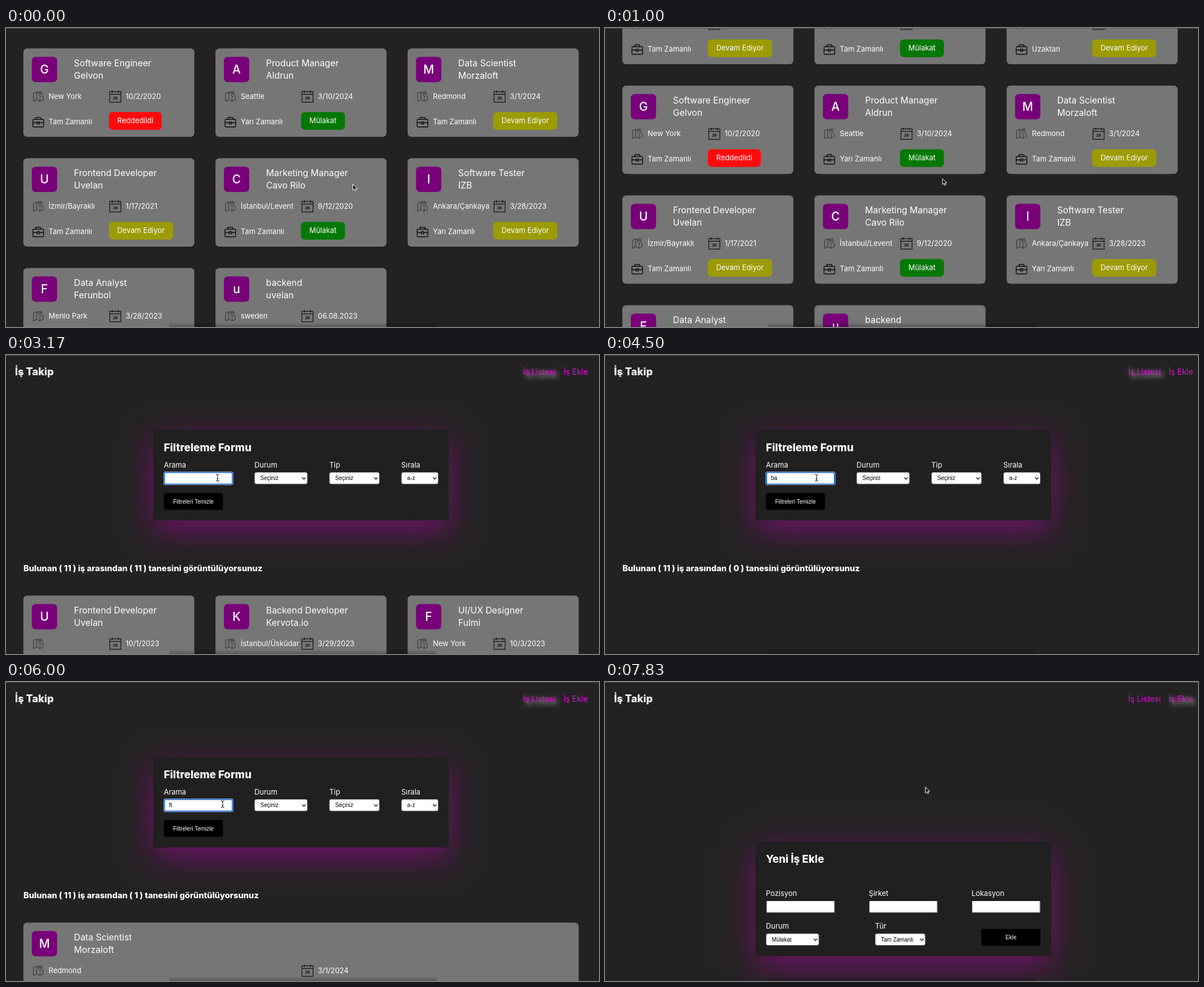
Recreate the animation shown at these times as an HTML page with a canvas. Size 1054 by 531 pixels, loop 8 s.

```html
<!DOCTYPE html>
<html lang="tr">
<head>
<meta charset="utf-8">
<title>İş Takip</title>
<style>
html, body { margin: 0; height: 100%; overflow: hidden; background: #232122; }
canvas { display: block; }
</style>
</head>
<body>
<canvas id="stage" width="1054" height="531"></canvas>
<script>
const W = 1054, H = 531, LOOP = 8000, STEP = 1000 / 6;
const ctx = document.getElementById('stage').getContext('2d');
const UI = 'Inter, "Open Sans", sans-serif';
const FIELD = '"Liberation Sans", Arial, sans-serif';
const BG = '#232122', LINK = '#e010d6';
const SMALL = 12.9, LARGE = 15.8;
const STATUS = { Reddedildi: '#ff0a0c', Mülakat: '#067806', 'Devam Ediyor': '#9c9b04' };

const FULL = 'Tam Zamanlı', PART = 'Yarı Zamanlı', REMOTE = 'Uzaktan';
const NO = 'Reddedildi', MEET = 'Mülakat', OPEN = 'Devam Ediyor';
const jobs = [
  ['Frontend Developer', 'Uvelan', '', '10/1/2023', FULL, OPEN],
  ['Backend Developer', 'Kervota.io', 'İstanbul/Üsküdar', '3/29/2023', FULL, MEET],
  ['UI/UX Designer', 'Fulmi', 'New York', '10/3/2023', REMOTE, OPEN],
  ['Software Engineer', 'Gelvon', 'New York', '10/2/2020', FULL, NO],
  ['Product Manager', 'Aldrun', 'Seattle', '3/10/2024', PART, MEET],
  ['Data Scientist', 'Morzaloft', 'Redmond', '3/1/2024', FULL, OPEN],
  ['Frontend Developer', 'Uvelan', 'İzmir/Bayraklı', '1/17/2021', FULL, OPEN],
  ['Marketing Manager', 'Cavo Rilo', 'İstanbul/Levent', '9/12/2020', FULL, MEET],
  ['Software Tester', 'IZB', 'Ankara/Çankaya', '3/28/2023', PART, OPEN],
  ['Data Analyst', 'Ferunbol', 'Menlo Park', '3/28/2023', REMOTE, NO],
  ['backend', 'uvelan', 'sweden', '06.08.2023', FULL, MEET]
];

// Timelines, keyed by step (six per second)
const scrollKeys = [[0, 586], [1, 596], [2, 640], [3, 665], [4, 671], [5, 664], [6, 520], [7, 190], [8, 0]];
const mouseKeys = [[0, 616, 277], [4, 618, 277], [7, 590, 262], [8, 521, 236], [11, 640, 235], [14, 392, 296],
  [15, 380, 222], [16, 376, 218], [28, 376, 218], [34, 385, 217], [37, 385, 217], [38, 1015, 26],
  [42, 1027, 9], [45, 1020, 22], [46, 1014, 28], [47, 569, 186]];
const edits = [[15, ''], [21, 'b'], [23, 'ba'], [29, 'b'], [30, ''], [31, 'f'], [33, 'ft'], [39, 'f'], [40, '']];
const ADD_PAGE = 46, IBEAM = [15, 37];

function track(keys, s) {
  const i = keys.findIndex(k => k[0] > s);
  if (i < 0) return keys[keys.length - 1].slice(1);
  const a = keys[i - 1], b = keys[i], u = (s - a[0]) / (b[0] - a[0]);
  return a.slice(1).map((v, n) => v + (b[n + 1] - v) * u);
}

function text(str, x, y, size, { weight = 400, color = '#fff', family = UI, align = 'left' } = {}) {
  ctx.font = `${weight} ${size}px ${family}`;
  ctx.fillStyle = color;
  ctx.textAlign = align;
  ctx.fillText(str, x, y);
}

function box(x, y, w, h, r, fill, stroke, line = 1) {
  ctx.beginPath();
  ctx.roundRect(x, y, w, h, r);
  if (fill) { ctx.fillStyle = fill; ctx.fill(); }
  if (stroke) { ctx.strokeStyle = stroke; ctx.lineWidth = line; ctx.stroke(); }
}

function path(d, x, y, { stroke, fill, line = 1 }) {
  const p = new Path2D(d);
  ctx.save();
  ctx.translate(x, y);
  if (fill) { ctx.fillStyle = fill; ctx.fill(p); }
  if (stroke) { ctx.strokeStyle = stroke; ctx.lineWidth = line; ctx.stroke(p); }
  ctx.restore();
}

const mapIcon = (x, y) => path(
  'M9 3L6 1.5 0.5 4V18L6 15.5 12 18 17.5 15.5V8M6 1.5V15.5M12 12V18' +
  'M12.5 10.5C10.5 7.5 9.2 6 9.2 3.8A3.3 3.3 0 0 1 15.8 3.8C15.8 6 14.5 7.5 12.5 10.5ZM11.3 3.8A1.2 1.2 0 0 0 13.7 3.8A1.2 1.2 0 0 0 11.3 3.8',
  x, y, { stroke: '#1c1c1c', line: 0.8 });

function calendarIcon(x, y) {
  path('M0.6 3H20.4V21.4H0.6ZM0.6 7.5H20.4M5 0.5V5M16 0.5V5', x, y, { stroke: '#111', line: 1.2 });
  text('26', x + 10.5, y + 17, 7.5, { weight: 700, color: '#111', family: FIELD, align: 'center' });
}

const bagIcon = (x, y) => path(
  'M2 4.5H18A1.5 1.5 0 0 1 19.5 6V16.5A1.5 1.5 0 0 1 18 18H2A1.5 1.5 0 0 1 0.5 16.5V6A1.5 1.5 0 0 1 2 4.5Z' +
  'M5.5 4.5V2.5Q5.5 1 7 1H13Q14.5 1 14.5 2.5V4.5M0.5 10.5H8M12 10.5H19.5M8 9H12V12.5H8Z',
  x, y, { stroke: '#0c0c0c', line: 1.4 });

function card([position, company, place, date, type, status], x, y, w) {
  const mid = x + w / 2;
  box(x, y, w, 157, 7, '#767676');
  box(x + 15, y + 15, 45, 45, 7, '#780078');
  text(company[0], x + 37.5, y + 44.7, 21, { weight: 500, align: 'center' });
  text(position, x + 90, y + 31.5, LARGE);
  text(company, x + 90, y + 54, LARGE);
  mapIcon(x + 17.5, y + 76);
  text(place, x + 45, y + 90, SMALL);
  calendarIcon(mid + 1, y + 74);
  text(date, mid + 30, y + 90, SMALL);
  bagIcon(x + 16.5, y + 121.5);
  text(type, x + 45, y + 135, SMALL);
  ctx.font = `400 ${SMALL}px ${UI}`;
  box(mid, y + 113, ctx.measureText(status).width + 30, 31.5, 7, STATUS[status]);
  text(status, mid + 15, y + 133, SMALL);
}

function header(dx, y, active) {
  text('İş Takip', 16, y + 35.5, 18.2, { weight: 800 });
  [['İş Listesi', 919], ['İş Ekle', 991]].forEach(([label, x], i) => {
    ctx.save();
    if (i === active) {
      ctx.shadowColor = 'rgba(255,255,255,.8)';
      ctx.shadowOffsetX = ctx.shadowOffsetY = 4;
      ctx.shadowBlur = 8;
    }
    text(label, x + dx, y + 34.5, 14.2, { color: LINK });
    ctx.restore();
  });
}

function panel(x, y, h, title) {
  ctx.save();
  ctx.shadowColor = 'rgba(114,18,108,.95)';
  ctx.shadowBlur = 56;
  ctx.shadowOffsetY = 18;
  box(x, y, 525, h, 0, BG);
  ctx.restore();
  box(x, y, 525, h, 0, '#211f20');
  text(title, x + 18.5, y + 38, 18.7, { weight: 800 });
}

const label = (str, x, y) => text(str, x, y, SMALL);

function input(x, y, value = '', focused, caret) {
  if (focused) {
    box(x - 1.5, y - 2, 124, 24, 4, '#fff');
    box(x, y - 0.5, 121, 21, 2.5, '#fff', '#1a5fc4', 2);
  } else {
    box(x, y, 121.5, 21, 1, '#858585');
    box(x + 0.5, y, 119.5, 19.5, 0, '#fff');
  }
  text(value, x + 8, y + 13, 10, { color: '#000', family: FIELD });
  if (caret) {
    ctx.fillStyle = '#000';
    ctx.fillRect(x + 8 + ctx.measureText(value).width, y + 4, 1, 12);
  }
}

function select(x, y, w, value) {
  box(x + 0.5, y + 0.5, w - 1, 20.5, 3, '#fff', '#8a8a8a');
  text(value, x + 10.5, y + 14, 10, { color: '#000', family: FIELD });
  path('M0 0L3 3 6 0', x + w - 9.5, y + 9.5, { stroke: '#111', line: 1.3 });
}

function button(str, x, y) {
  box(x, y, 105, 30, 4, '#000');
  text(str, x + 52.5, y + 18.5, 10, { family: FIELD, align: 'center' });
}

function listPage(s, scroll) {
  const edit = edits.filter(e => e[0] <= s).pop();
  const query = edit ? edit[1] : '';
  const found = jobs.filter(j => j[1].toLowerCase().includes(query));
  const dx = found.length ? 0 : 11;   // room freed by the scrollbar
  const x = 262 + dx / 2, y = -scroll;

  panel(x, y + 133, 160.5, 'Filtreleme Formu');
  header(dx, y, 0);
  [['Arama', 18.5], ['Durum', 179.5], ['Tip', 312.5], ['Sırala', 440.5]]
    .forEach(([str, at]) => label(str, x + at, y + 199.5));
  input(x + 19.5, y + 209, query, edit, edit && (s - edit[0]) % 6 < 3);
  select(x + 179.5, y + 208, 94.5, 'Seçiniz');
  select(x + 312.5, y + 208, 89.5, 'Seçiniz');
  select(x + 440.5, y + 208, 66, 'a-z');
  button('Filtreleri Temizle', x + 18.5, y + 245);

  text(`Bulunan ( ${jobs.length} ) iş arasından ( ${found.length} ) tanesini görüntülüyorsunuz`,
    31, y + 384, 14.7, { weight: 800 });
  const cols = Math.min(3, found.length), gap = 37.5;
  const w = (987 - gap * (cols - 1)) / cols;
  found.forEach((job, i) =>
    card(job, 30.8 + (i % cols) * (w + gap), y + 427.2 + Math.floor(i / cols) * 195, w));
}

function addPage() {
  const x = 267.5;
  panel(x, 283, 204, 'Yeni İş Ekle');
  header(11, 0, 1);
  ['Pozisyon', 'Şirket', 'Lokasyon'].forEach((str, i) => {
    label(str, x + 18.5 + i * 182.7, 379.5);
    input(x + 19.5 + i * 182.7, 389, '');
  });
  label('Durum', x + 18.5, 438);
  label('Tür', x + 212.5, 438);
  select(x + 18.5, 446.5, 94.5, 'Mülakat');
  select(x + 212.5, 446.5, 89.5, 'Tam Zamanlı');
  button('Ekle', x + 401.5, 438.5);
}

function pointer(s) {
  const [x, y] = track(mouseKeys, s);
  if (s >= IBEAM[0] && s <= IBEAM[1]) {
    const beam = 'M-3 -6Q0 -6 0 -4Q0 -6 3 -6M0 -4V4M-3 6Q0 6 0 4Q0 6 3 6M-1.5 2H1.5';
    path(beam, x, y, { stroke: '#fff', line: 2.2 });
    path(beam, x, y, { stroke: '#111', line: 1 });
  } else {
    path('M0.5 0.5V11L3 8.8 4.6 12.4 6.5 11.6 4.9 8.1H8.2Z', x, y, { fill: '#0a0a0a', stroke: '#fff', line: 1 });
  }
}

// Grey line at the top, soft shade along the bottom
function edges() {
  ctx.fillStyle = '#505050';
  ctx.fillRect(0, 0, W, 1);
  const shade = ctx.createLinearGradient(0, H - 8, 0, H);
  shade.addColorStop(0, 'rgba(0,0,0,0)');
  shade.addColorStop(1, 'rgba(0,0,0,.25)');
  ctx.fillStyle = shade;
  ctx.fillRect(290, H - 8, 475, 8);
}

function draw(now) {
  // The small lead absorbs rounding at step borders
  const s = Math.floor((now % LOOP + 8) / STEP) % 48;
  ctx.fillStyle = BG;
  ctx.fillRect(0, 0, W, H);
  if (s < ADD_PAGE) listPage(s, track(scrollKeys, s)[0]);
  else addPage();
  edges();
  pointer(s);
}

let start;
function tick(now) {
  start ??= now;
  draw(now - start);
  requestAnimationFrame(tick);
}
requestAnimationFrame(tick);
</script>
</body>
</html>
```
